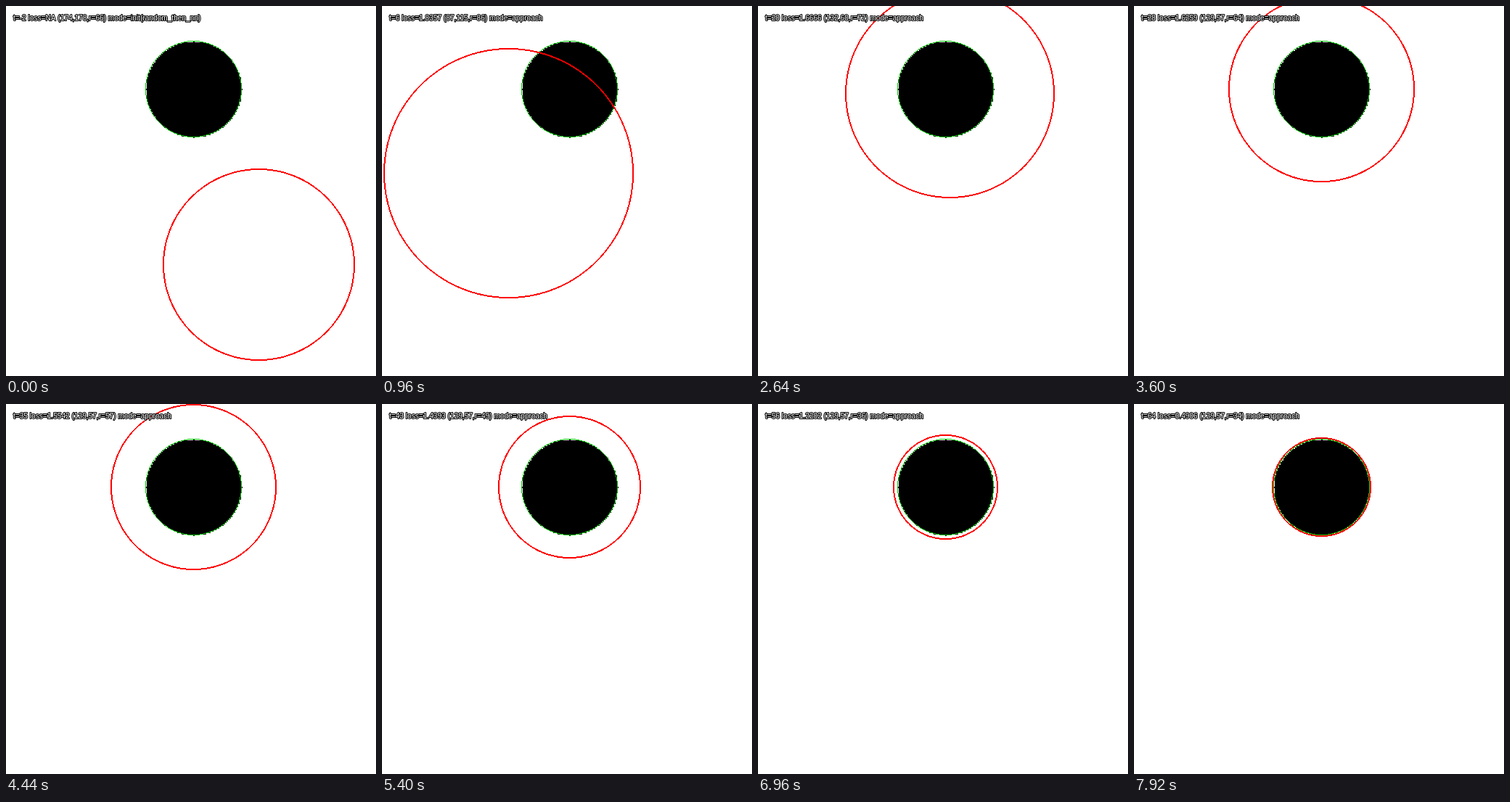
Write an HTML page with a canvas that moves like this. It is 510x510 px and loops after 8000 ms.

```html
<!DOCTYPE html>
<html lang="en">
<head>
<meta charset="utf-8">
<title>Circle fit</title>
<style>
  html, body { margin: 0; width: 100%; height: 100%; overflow: hidden; background: #fff; }
  canvas { display: block; width: 510px; height: 510px; }
</style>
</head>
<body>
<canvas id="stage" width="510" height="510"></canvas>
<script>
const ctx = document.getElementById('stage').getContext('2d');
const LOOP = 8000, STEP = 120, SCALE = 2;
const goal = { x: 129, y: 57, r: 33 };

// Turning points [step, value]: overshoot, swing back, settle on the goal
const swingX = [[0, 174], [7, 82], [15, 136], [25, 128], [28, goal.x]];
const swingY = [[-0.5, 178], [13, 44], [17, 62], [25, 56], [28, goal.y]];
const lossKeys = [[0, 1.95], [13, 1.7023], [28, 1.6259], [35, 1.5542], [43, 1.4393], [56, 1.2202], [58, 0.4906]];

const linear = p => p;
const cosine = p => (1 - Math.cos(p * Math.PI)) / 2;

function sample(keys, t, ease) {
  const next = keys.findIndex(([step]) => step >= t);
  if (next < 0) return keys[keys.length - 1][1];
  if (next === 0) return keys[0][1];
  const [t0, v0] = keys[next - 1], [t1, v1] = keys[next];
  return v0 + (v1 - v0) * ease((t - t0) / (t1 - t0));
}

function stateAt(t) {
  return {
    x: Math.round(sample(swingX, t, cosine)),
    y: Math.round(sample(swingY, t, cosine)),
    r: t < -1 ? 66 : Math.max(goal.r + 1, 92 - t),
    loss: t < 0 ? 'NA' : sample(lossKeys, t, linear).toFixed(4),
    mode: t < 0 ? 'init(random_then_nn)' : 'approach'
  };
}

// Hard-edged circle outline, built from one octant mirrored eight ways
function ring({ x, y, r }, width, color) {
  const cx = x * SCALE, cy = y * SCALE, outerR = r * SCALE, innerR = outerR - width + 1;
  ctx.fillStyle = color;
  for (let b = 0; b <= outerR * Math.SQRT1_2; b++) {
    const outer = Math.round(Math.sqrt(outerR ** 2 - b * b));
    const inner = Math.round(Math.sqrt(innerR ** 2 - b * b));
    const length = outer - inner + 1;
    for (const side of [b, -b]) {
      ctx.fillRect(cx + inner, cy + side, length, 1);
      ctx.fillRect(cx - outer, cy + side, length, 1);
      ctx.fillRect(cx + side, cy + inner, 1, length);
      ctx.fillRect(cx + side, cy - outer, 1, length);
    }
  }
}

function blockDisc({ x, y, r }) {
  ctx.fillStyle = '#000';
  for (let dy = -r; dy <= r; dy++) {
    const half = Math.floor(Math.sqrt(r * r - dy * dy));
    ctx.fillRect((x - half) * SCALE, (y + dy) * SCALE, (2 * half + 1) * SCALE, SCALE);
  }
}

function label(text) {
  ctx.font = '10.15px "Liberation Sans", Arial, sans-serif';
  ctx.lineJoin = 'round';
  ctx.lineWidth = 2;
  ctx.strokeStyle = '#000';
  ctx.strokeText(text, 10, 20);
  ctx.fillStyle = '#fff';
  ctx.fillText(text, 10, 20);
}

function draw(t) {
  const s = stateAt(t);
  ctx.fillStyle = '#fff';
  ctx.fillRect(0, 0, 510, 510);
  blockDisc(goal);
  ring(goal, 1, '#00c800');
  ring(s, 2, '#f00');
  label(`t=${t} loss=${s.loss} (${s.x},${s.y},r=${s.r}) mode=${s.mode}`);
}

let shown = null;
function tick() {
  const t = Math.floor(performance.now() % LOOP / STEP) - 2;
  if (t !== shown) draw(shown = t);
  requestAnimationFrame(tick);
}
tick();
</script>
</body>
</html>
```
